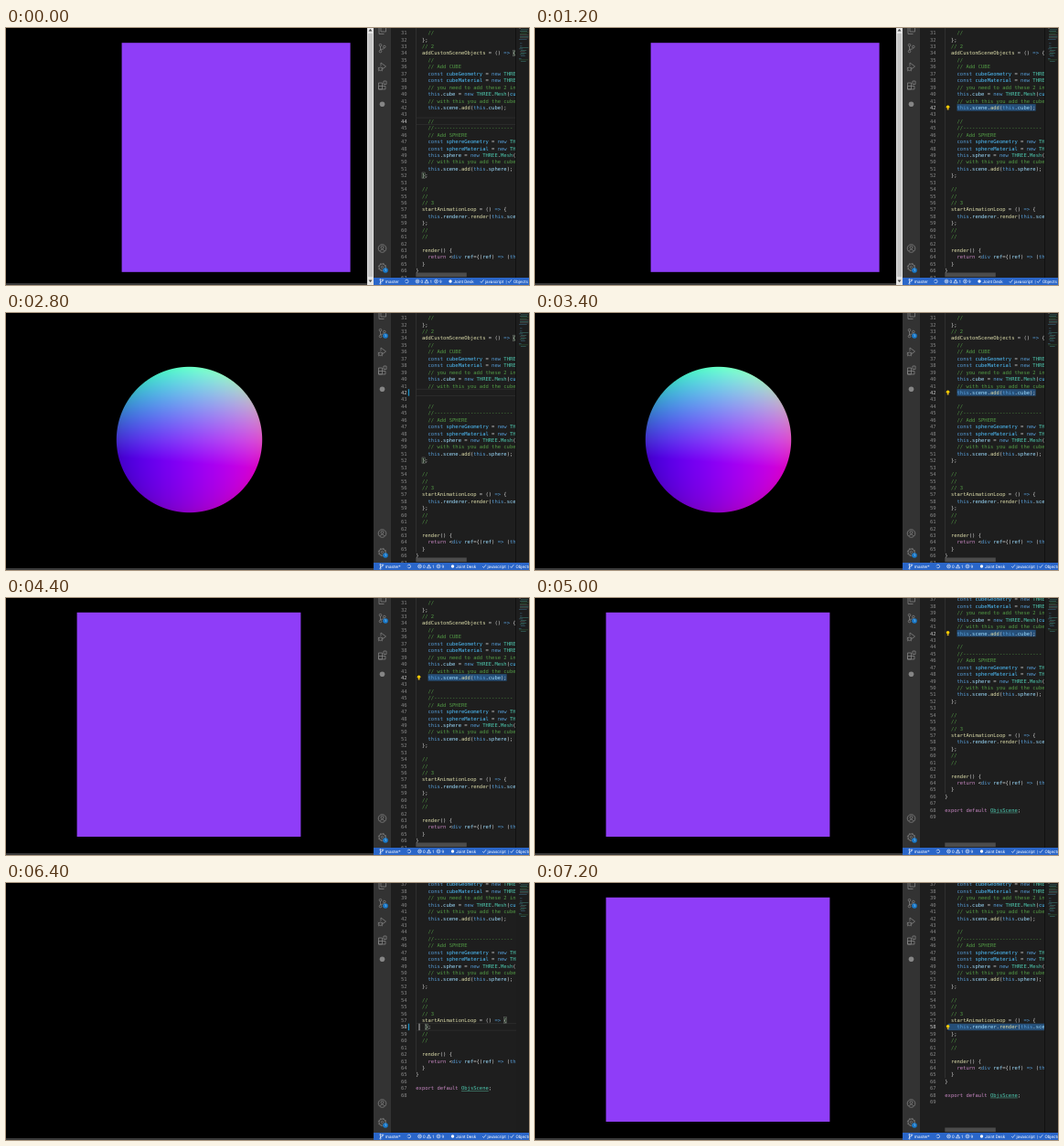
Recreate the animation shown at these times as an HTML page with a canvas. Size 572 by 281 pixels, loop 7.4 s.

```html
<!DOCTYPE html>
<html lang="en">
<head>
<meta charset="utf-8">
<title>Scene and editor</title>
<style>
  html, body { margin: 0; width: 100%; height: 100%; overflow: hidden; background: #000; }
  #stage { position: absolute; left: 0; top: 0; width: 572px; height: 281px; overflow: hidden; background: #000; }
  #ball, #ui { position: absolute; }
  #ball { left: 118px; top: 56px; }
  #ui { left: 0; top: 0; }
  text { text-rendering: geometricPrecision; white-space: pre; }
  .code text { font: 5.5px "DejaVu Sans Mono", monospace; }
  .status text { font: 4.7px Roboto, sans-serif; fill: #fff; }
  .icon { fill: none; stroke: #858585; stroke-width: .75; }
</style>
</head>
<body>
<div id="stage">
  <canvas id="ball" width="165" height="165"></canvas>
  <svg id="ui" width="572" height="281" viewBox="0 0 572 281">
    <defs><clipPath id="pane"><rect x="421" width="137" height="273"/></clipPath></defs>
    <rect id="cube" fill="#8f3df8"/>
    <rect y="279" width="402" height="2" fill="#3a3a3a"/>
    <g id="bar">
      <rect x="395" width="7" height="281" fill="#e4e4e4"/>
      <rect x="396" y="6" width="5" height="266" fill="#c6c6c6"/>
      <path d="M396.5 3.5h4l-2-2.5zM396.5 275.5h4l-2 2.5z" fill="#444"/>
    </g>
    <rect x="402" width="170" height="273" fill="#1e1e1e"/>
    <rect x="402" width="19" height="273" fill="#333"/>
    <g class="icon">
      <path d="M410 -3h5.500v7h-5.500zM408 0v6.500h5.500"/>
      <g transform="translate(411.500 22)">
        <circle cx="-2" cy="-3.300" r="1.300"/><circle cx="-2" cy="3.500" r="1.300"/><circle cx="2.300" cy="-1.500" r="1.300"/>
        <path d="M-2 -2v4.200M2.300 -.2Q2 1.300 -2 1.500"/>
      </g>
      <g transform="translate(411.500 42.500)">
        <path d="M-1.500 -1v-3.500l5.500 4l-4 3"/><circle cx="-2" cy="2.300" r="1.800"/><path d="M-4.700 .5l1.200 .8M-4.800 2.500h1M-4.500 4.600l1 -.8M.7 .5l-1.200 .8M.9 2.500h-1M.5 4.600l-1 -.8"/>
      </g>
      <path d="M407.500 60h4v7h-4zM407.500 63.500h7.500v3.500h-7.500zM413 58h3v3.500h-3z"/>
      <circle cx="411.500" cy="83.300" r="2.800" fill="#858585" stroke="none"/>
      <g transform="translate(411.500 241)">
        <circle r="4.300"/><circle cy="-1.200" r="1.500"/><path d="M-2.800 3Q0 -.8 2.800 3"/>
      </g>
      <g transform="translate(411.500 261.500)">
        <circle r="3.500"/><circle r="1.200"/><circle r="4.200" stroke-dasharray="1.650 1.650"/>
      </g>
    </g>
    <g id="badges"></g>
    <g class="code" id="code" clip-path="url(#pane)"></g>
    <g id="map"></g>
    <g class="status">
      <rect x="402" y="273" width="170" height="8" fill="#2a66c9"/>
      <g fill="none" stroke="#fff" stroke-width=".6">
        <path d="M409.500 275.700v3.300M412 276q0 1.700 -2.500 1.700"/>
        <circle cx="409.500" cy="275.200" r=".7"/><circle cx="409.500" cy="279.300" r=".7"/><circle cx="412" cy="275.500" r=".7"/>
      </g>
      <text x="414.800" y="278.800" id="branch"></text>
      <g id="items">
        <g fill="none" stroke="#fff" stroke-width=".6">
          <circle cx="438.300" cy="277" r="1.800" stroke-dasharray="4.300 1.350"/>
          <circle cx="450" cy="277" r="1.900"/><path d="M449.200 276.200l1.600 1.600m0 -1.600l-1.600 1.600"/>
          <path d="M460 275l2.100 3.800h-4.200zM460 276.300v1.200"/>
          <circle cx="470.500" cy="277" r="1.900"/><path d="M470.500 276v2"/>
          <path d="M518.700 277l1.300 1.500l2.500 -3.300M549 277l1.300 1.500l2.500 -3.300"/>
        </g>
        <circle cx="486" cy="277" r="1.700" fill="#fff"/>
        <text x="453.500" y="278.800">0</text>
        <text x="463.500" y="278.800">1</text>
        <text x="474" y="278.800">9</text>
        <text x="489.500" y="278.800">Joint Desk</text>
        <text x="524" y="278.800">javascript</text>
        <text x="546.500" y="278.800">|</text>
        <text x="555" y="278.800">Objects</text>
      </g>
    </g>
  </svg>
</div>
<script>
const $ = id => document.getElementById(id);
const LOOP = 7400, FIRST = 31, ROW = 7.43, COL = 3.311, LEFT = 448.3;

const SOURCE = `    //
  };
  // 2
  addCustomSceneObjects = () => {
    //
    // Add CUBE
    const cubeGeometry = new THREE.BoxGeometry
    const cubeMaterial = new THREE.MeshNormalMaterial
    // you need to add these 2 in
    this.cube = new THREE.Mesh(cubeGeometry
    // with this you add the cube
    this.scene.add(this.cube);

    //
    //--------------------------
    // Add SPHERE
    const sphereGeometry = new THREE.SphereGeometry
    const sphereMaterial = new THREE.MeshNormalMaterial
    this.sphere = new THREE.Mesh(sphereGeometry
    // with this you add the cube
    this.scene.add(this.sphere);
  };

  //
  //
  // 3
  startAnimationLoop = () => {
    this.renderer.render(this.scene, this.camera);
  };
  //
  //

  render() {
    return <div ref={(ref) => (this.mount = ref)} />;
  }
}

export default ObjsScene;
`.split("\n");

// Each step changes only the listed fields.
const STEPS = [
  [0, { view: "wide", saved: true, scroll: 0, cut: 0, line: 44, pick: null, pair: [34, 52] }],
  [1000, { line: 0, pick: [42, 4, 30], pair: null }],
  [1600, { cut: 42, line: 42, pick: null, pair: [34, 52] }],
  [2400, { view: "ball", saved: false }],
  [3000, { cut: 0, line: 0, pick: [42, 4, 30], pair: null }],
  [3600, { view: "cube" }],
  [4800, { scroll: 48.4 }],
  [5200, { pick: [58, 1, 40] }],
  [5600, { cut: 58, line: 58, pick: null, pair: [57, 58] }],
  [6000, { view: "none" }],
  [6600, { cut: 0, line: 0, pick: [58, 1, 40], pair: null }],
  [7000, { view: "cube" }]
];

const RULES = [
  [/^\/\/.*/, "#529a45"],
  [/^(this|const|new|div)\b|^=>/, "#569cd6"],
  [/^(return|export|default)\b/, "#c586c0"],
  [/^(THREE|Mesh|ObjsScene)\b/, "#4ec9b0"],
  [/^\w+(Geometry|Material)\b/, "#4fc1ff"],
  [/^\w+(?=\(| = \(\))/, "#dcdcaa"],
  [/^\w+/, "#9cdcfe"],
  [/^\W/, "#d4d4d4"]
];

const rect = (x, y, w, h, fill, more = "") =>
  `<rect x="${x}" y="${y}" width="${w}" height="${h}" fill="${fill}" ${more}/>`;
const escape = s => s.replace(/&/g, "&amp;").replace(/</g, "&lt;");

function paint(text) {
  let out = "";
  while (text) {
    const [rule, color] = RULES.find(([r]) => r.test(text));
    const part = text.match(rule)[0];
    out += `<tspan fill="${color}">${escape(part)}</tspan>`;
    text = text.slice(part.length);
  }
  return out;
}

function editor(s) {
  const lines = SOURCE.slice();
  if (s.cut === 42) lines[42 - FIRST] = "";
  if (s.cut === 58) lines.splice(58 - FIRST, 2, "   };");
  const top = n => 1.5 + (n - FIRST) * ROW - s.scroll;
  const at = c => LEFT + c * COL;
  const end = FIRST + lines.length - 1;
  let out = rect(LEFT, top(FIRST) - 9, .5, top(end - 3) - top(FIRST) + 9, "#404040");

  if (s.line) out += rect(LEFT, top(s.line), 112, ROW, "none", 'stroke="#303030" stroke-width=".7"');
  if (s.cut) out += rect(439.8, top(s.cut), 1.3, ROW, "#1b8fc4");
  if (s.pick) {
    const [n, a, b] = s.pick;
    out += rect(at(a), top(n), (b - a) * COL, ROW, "#264f78");
  }
  for (const n of s.pair || []) {
    const col = lines[n - FIRST].search(/[{}]/);
    out += rect(at(col), top(n) + .4, COL, 6.6, "#233323", 'stroke="#6c6c6c" stroke-width=".5"');
  }
  lines.forEach((line, i) => {
    const n = FIRST + i, y = top(n) + 5.7, indent = line.search(/\S/);
    const lit = n === s.line || (s.pick && n === s.pick[0]);
    out += `<text x="438.5" y="${y}" text-anchor="end" fill="${lit ? "#c6c6c6" : "#858585"}">${n}</text>`;
    if (indent >= 0) out += `<text x="${at(indent)}" y="${y}">${paint(line.trim())}</text>`;
    if (line.startsWith("export"))
      out += `<path d="M${at(15)} ${y + 1.2}h${9 * COL}" stroke="#4c9a86" stroke-width=".6"/>`;
  });
  if (s.pick) {
    const y = top(s.pick[0]) + 3;
    out += `<circle cx="451.6" cy="${y}" r="1.8" fill="#ffcc00"/>` + rect(450.7, y + 1.8, 1.8, 1.5, "#d8b030");
  }
  if (s.cut === 58) out += rect(at(1), top(58), .8, ROW, "#ddd");
  else out += rect(LEFT, 267.5, 55.5, 4.7, "#4c4c4c") + rect(557, 0, 1, 273, "#111");
  return out;
}

function badge(x, y) {
  return `<circle cx="${x}" cy="${y}" r="2.8" fill="#1878c8"/>` +
    `<text x="${x}" y="${y + 1.3}" text-anchor="middle" fill="#fff" style="font:3.6px Roboto,sans-serif">1</text>`;
}

function miniMap() {
  const tones = ["#2f5233", "#37586c", "#34665f", "#565656"];
  let seed = 7, out = rect(558, 0, 14, 273, "#1d1d1d");
  const rnd = () => (seed = seed * 16807 % 2147483647) / 2147483647;
  for (let y = 0; y < 37; y += 1.5) {
    const w = 2 + rnd() * 8, tone = tones[Math.floor(rnd() * 4)];
    if (rnd() < .75) out += rect(561 + Math.floor(rnd() * 3), y, w, .7, tone);
  }
  return out;
}

// Sphere shaded by its surface normals.
function drawBall() {
  const ctx = $("ball").getContext("2d"), size = 165, R = 79.7;
  const img = ctx.createImageData(size, size);
  for (let j = 0; j < size; j++) for (let i = 0; i < size; i++) {
    const nx = (i - 82) / R, ny = (82 - j) / R, d = Math.hypot(nx, ny);
    const nz = Math.sqrt(Math.max(0, 1 - d * d));
    img.data.set([
      143 + 78 * nx - 40 * Math.max(0, ny),
      62 + 195 * (ny + .08 * nx),
      190 + 58 * nz,
      255 * Math.min(1, Math.max(0, R * (1 - d) + .5))
    ], 4 * (j * size + i));
  }
  ctx.putImageData(img, 0, 0);
}

function place(x, y, width, height) {
  for (const [key, value] of Object.entries({ x, y, width, height })) $("cube").setAttribute(key, value);
}

function show(s) {
  $("ball").style.display = s.view === "ball" ? "block" : "none";
  $("cube").style.display = /wide|cube/.test(s.view) ? "" : "none";
  if (s.view === "wide") place(126.6, 16.2, 250, 250.6);
  else place(77.6, 15.8, 244.8, 245.2);
  $("bar").style.display = s.saved ? "" : "none";
  $("branch").textContent = s.saved ? "master" : "master*";
  $("items").setAttribute("transform", `translate(${s.saved ? 0 : 2.5} 0)`);
  $("badges").innerHTML = badge(415, 265) + (s.saved ? "" : badge(415, 25));
  $("code").innerHTML = editor(s);
}

const states = [];
STEPS.reduce((prev, [, change]) => {
  const next = { ...prev, ...change };
  states.push(next);
  return next;
}, {});

let current = -1;
function update(t) {
  const i = STEPS.findLastIndex(([at]) => at <= t);
  if (i !== current) show(states[current = i]);
}

drawBall();
$("map").innerHTML = miniMap();
update(0);
const start = performance.now();
requestAnimationFrame(function tick() {
  update((performance.now() - start) % LOOP);
  requestAnimationFrame(tick);
});
</script>
</body>
</html>
```
